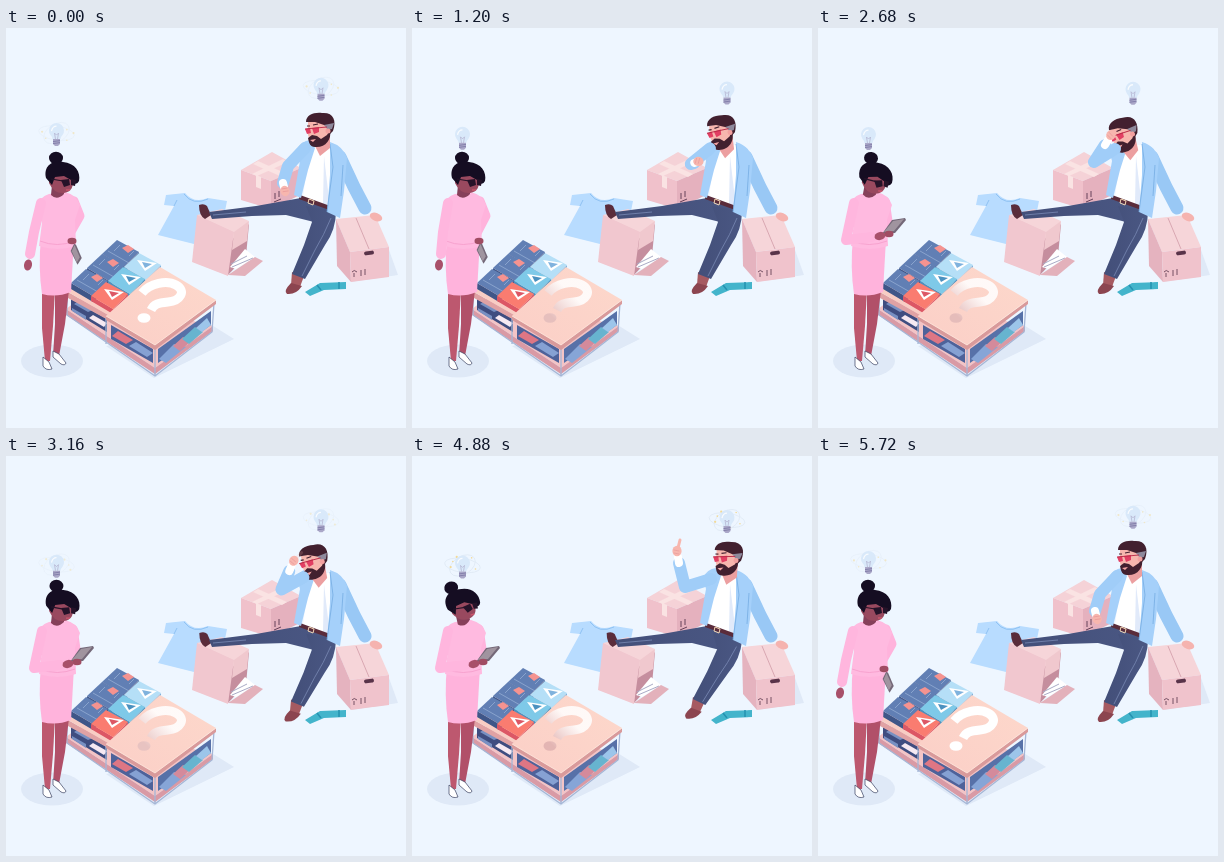
An HTML page that plays this animation: 400x400 px, repeating every 5760 ms.

```html
<!DOCTYPE html>
<html lang="en">
<head>
<meta charset="utf-8">
<style>
html, body { margin: 0; width: 100%; height: 100%; overflow: hidden; background: #eef6ff; }
svg { display: block; width: 100vw; height: 100vh; }
.limb { fill: none; stroke-linecap: round; stroke-linejoin: round; }
</style>
</head>
<body>
<svg viewBox="0 0 400 400">
  <defs>
    <linearGradient id="fade" gradientUnits="userSpaceOnUse" x1="136" y1="291" x2="166" y2="260">
      <stop id="fadeLow" offset=".1"/>
      <stop id="fadeHigh" offset=".8" stop-color="#fff"/>
    </linearGradient>
    <linearGradient id="board" x1="0" y1="1" x2="1" y2="0">
      <stop stop-color="#fbcfc7"/><stop offset="1" stop-color="#fdd8cb"/>
    </linearGradient>
    <linearGradient id="denim" x1="0" x2="1">
      <stop stop-color="#434f79"/><stop offset="1" stop-color="#4a5783"/>
    </linearGradient>
    <g id="jeans">
      <path fill="#3f5688" d="M-15 14L7 27 22 12V17L7 33-15 20Z"/>
      <path fill="#617fb4" d="M0 0L22 12 7 27-15 14Z"/>
      <path fill="none" stroke="#9bb3d8" stroke-width=".7" d="M-9 11L12 23M3 5L-3 11M17 11l-5 5"/>
      <path fill="#f59390" d="M5 8l6-3 6 4-6 4z"/>
    </g>
    <g id="shirt">
      <path fill="var(--d)" d="M-15 14L7 27 22 12V17L7 32-15 19Z"/>
      <path fill="var(--c)" d="M0 0L22 12 7 27-15 14Z"/>
      <path fill="#fff" d="M-2 7L18 10 6 18Z"/>
      <path fill="var(--d)" d="M3 9L13 11 6 15Z"/>
    </g>
    <g id="rings" fill="none" stroke-width=".8">
      <ellipse rx="18" ry="7" transform="rotate(8)"/>
      <ellipse rx="14" ry="9" transform="rotate(-32)"/>
    </g>
  </defs>

  <!-- ground shadows -->
  <g fill="#dfe9f7">
    <ellipse cx="46" cy="333" rx="31" ry="16.500"/>
    <path d="M100 318L148 350 228 311 204 296Z"/>
    <path d="M383 222L392 247 345 254Z"/>
  </g>

  <!-- shelf -->
  <g>
    <path fill="#f3c4c6" d="M60 281L80 266 207 298 149 340Z"/>
    <path fill="#d99aa5" d="M60 281L149 340 207 298V303L149 346 60 287Z"/>
    <path fill="#3f4d80" d="M65 271l36 20v13L65 282z"/>
    <path fill="#7890c2" d="M68 276l14 8 5-2-14-9zM66 280l14 8v4l-14-9z"/>
    <path fill="#f6e9f2" d="M83 290l15 9 3-4-14-8z"/>
    <path fill="#4e629a" d="M105 297l42 24v14l-42-24z"/>
    <path fill="#de7684" d="M106 308l14 8 7-4-15-9z"/>
    <path fill="#86a1d3" d="M123 318l18 11 6-4-17-11z"/>
    <path fill="#5771a8" d="M152 321L205 283v14l-53 38z"/>
    <path fill="#86a5d7" d="M153 331l15-15 12 3-20 16z"/>
    <path fill="#d48a9b" d="M167 318l10-9 8 4-11 10z"/>
    <path fill="#67b4cf" d="M176 311l13-12 8 5-14 12z"/>
    <path fill="#9cc5ea" d="M190 300l11-10 4 7-9 7z"/>
    <path fill="#e0a2a4" d="M62 264L104 288V293L62 270Z"/>
    <path fill="#f8cdc4" d="M62 264L111 214 155 239 104 288Z"/>
    <use href="#jeans" x="111" y="212"/>
    <use href="#jeans" x="96" y="226"/>
    <use href="#jeans" x="80" y="241"/>
    <g style="--c:#b5dff7;--d:#7fb2dd"><use href="#shirt" x="133" y="225"/></g>
    <g style="--c:#7ec9e8;--d:#4b91bf"><use href="#shirt" x="117" y="239"/></g>
    <g style="--c:#fa7c70;--d:#dc5765"><use href="#shirt" x="100" y="254"/></g>
    <path fill="none" stroke="#a5b6d6" stroke-width="1.300" d="M61 266v21L149 348 206 304 208 275M100 290v26M149 319v29"/>
    <path fill="#d99a9b" d="M100 288L149 317 210 272V276L149 322 100 292Z"/>
    <path fill="url(#board)" d="M100 288L154 239 210 272 149 317Z"/>
    <path fill="none" stroke="#fee8dc" stroke-width=".8" d="M100 288L149 317 210 272"/>
    <path fill="none" stroke="url(#fade)" stroke-width="9" d="M136 265C144 255 161 252 170 257C181 263 174 273 162 274C152 275 148 276 145 282"/>
    <ellipse cx="138" cy="290" rx="6.500" ry="4.800" fill="url(#fade)"/>
  </g>

  <!-- tee and boxes -->
  <path fill="#b8dcff" d="M160 167L179 165Q188 176 202 170L221 173 219 183 208 184 188 216 152 207 168 178 158 177Z"/>
  <path fill="none" stroke="#8fc2f3" d="M178 166Q187 178 202 171M168 178L171 172"/>
  <g>
    <path fill="#f5d2d7" d="M235 142L266 124 295 140 265 153Z"/>
    <path fill="#f0c1cb" d="M235 142L265 153V181L235 172Z"/>
    <path fill="#e5b1be" d="M265 153L295 140 292 168 265 181Z"/>
    <path fill="#fae3e3" d="M247 136l5-3 29 13-5 3zM250 147l5 2v12l-5-2zM277 131l5 3-31 14-5-2z"/>
    <path fill="none" stroke="#67425a" d="M269 171v-6M273 169v-6M268 174l7-3"/>
  </g>
  <g>
    <path fill="#c58e9e" d="M222 214L243 196 240 228 222 247Z"/>
    <path fill="#fff" d="M224 239L239 221 249 229 230 241Z"/>
    <path fill="none" stroke="#a9abc6" d="M226 239l21-9M225 236l16-8"/>
    <path fill="#e3b1bb" d="M222 247L249 229 257 233 239 248Z"/>
    <path fill="#f6d5d9" d="M191 187L216 181 243 193 226 212Z"/>
    <path fill="#f1c7cf" d="M191 187L228 204 222 248 186 234Z"/>
    <path fill="#f0c8ce" d="M228 204L243 193 241 213 226 222Z"/>
  </g>
  <g>
    <path fill="#f6d5d9" d="M330 191L369 187 383 219 344 224Z"/>
    <path fill="#e5b3bf" d="M330 191L344 224 345 254 331 238Z"/>
    <path fill="#f0c3cc" d="M344 224L383 219V249L345 254Z"/>
    <path fill="none" stroke="#d19ba8" stroke-width=".8" d="M350 190L363 221"/>
    <rect x="358" y="223" width="10" height="4" rx="2" fill="#593349" transform="rotate(-7 363 225)"/>
    <path fill="none" stroke="#684459" stroke-width=".9" d="M348 249v-4M346 244q2-3 5 0M355 248v-6M359 247v-6"/>
  </g>
  <path fill="#43b4cb" d="M299 264L314 255 340 254 340 261 318 262 304 268Z"/>
  <path fill="none" stroke="#2591b0" stroke-width="1.500" d="M333 254v7M311 257l4 5"/>

  <!-- man -->
  <g id="man">
    <path id="manFarShoe" fill="#5a2c3b" d="M193 177Q198 175 201 178L205 187 199 191Q193 188 193 177Z"/>
    <path fill="url(#denim)" d="M295 170L250 178 203 184 206 191 246 188 280 187 312 195 322 180Z"/>
    <g id="manLeg">
      <path fill="#a65a61" d="M286 244L298 248 294 259 285 257Z"/>
      <path fill="#8c4550" d="M285 255L296 258Q290 267 281 266Q277 263 285 255Z"/>
      <path fill="url(#denim)" d="M300 178L330 183Q330 202 319 217L299 251 286 246 298 217 306 194Z"/>
      <path fill="none" stroke="#7989b4" stroke-width=".8" d="M325 190Q318 207 309 222L296 248"/>
    </g>
    <path fill="none" stroke="#7989b4" stroke-width=".8" d="M240 184L207 187"/>
    <path fill="#fff" d="M307 117L325 117 326 181 297 169 301 139Z"/>
    <path fill="#e1eafa" d="M318 128l6 52-7-4z"/>
    <path fill="#5a2c3b" d="M294 167L327 179 326 183 293 171Z"/>
    <path fill="none" stroke="#f4d7b5" d="M303 171l5 2-1 4-5-2z"/>
    <path class="limb" stroke="#99c8f5" stroke-width="13" d="M334 129L348 159 359 180"/>
    <ellipse cx="370" cy="189" rx="6.500" ry="4" fill="#f5b3af" transform="rotate(20 370 189)"/>
    <path fill="#a5d0fa" d="M304 112L309 120 302 142 295 170 288 167 294 133 291 122Q295 113 304 112Z"/>
    <path fill="#a5d0fa" d="M324 114Q337 118 341 130L338 163 334 190 321 184 324 147Z"/>
    <path fill="none" stroke="#75ade3" stroke-width=".8" d="M324 116L327 139 321 184M337 137l-2 31"/>
  </g>
  <g id="manHead">
    <path fill="#ec9fa0" d="M311 106H324V120L314 128 309 118Z"/>
    <path fill="#f7b6ae" d="M302 94L322 92 324 106 318 114 305 115 302 107Z"/>
    <path fill="#42202f" d="M300 94C300 87 308 84 316 85C327 84 331 92 327 103L323 107 321 98 309 94Z"/>
    <path fill="#42202f" d="M302 110L306 107 311 108 315 111 321 107 324 102C326 112 319 120 309 119C304 119 303 115 302 110Z"/>
    <path fill="#8e899c" d="M318 97L328 95 326 101 322 102Z"/>
    <path fill="#f6a6a5" d="M304 112l6-1-3 3z"/>
    <circle cx="322" cy="103" r="2.500" fill="#f2a09f"/>
    <path fill="#e23f63" d="M299 101l5-1 1 5-4 1zM306 100l7-1v5l-5 2z"/>
    <path stroke="#b92846" stroke-width=".9" d="M299 101l22-2"/>
    <path stroke="#42202f" stroke-width="1.200" d="M301 98h3M307 97l5-1"/>
  </g>
  <path id="manArm" class="limb" stroke="#a0cdf8" stroke-width="12"/>
  <path id="manCuff" class="limb" stroke="#fff" stroke-width="8"/>
  <g id="manHand" fill="#f7b6ae">
    <ellipse rx="4.600" ry="5.200"/>
    <path id="finger" class="limb" stroke="#f7b6ae" stroke-width="3" d="M1-3L3-11"/>
    <path class="limb" stroke="#e99a9b" stroke-width=".7" d="M-3-1l5 1M-3 2l5 1"/>
  </g>

  <!-- woman -->
  <g id="woman">
    <path id="womanFarArm" class="limb" stroke="#ffb3dc" stroke-width="9"/>
    <path fill="#bd586f" d="M36 262H49L47 298 44 333H39L36 300Z"/>
    <path fill="#b15069" d="M49 262H63L59 296 53 328H47L49 296Z"/>
    <path fill="#fff" stroke="#39405f" stroke-width=".7" d="M37 329L43 334 46 341Q40 343 37 338ZM47 323L53 326 60 335Q59 338 55 336L47 329Z"/>
    <path fill="#ffb3dc" d="M35 209L68 211 65 264Q50 270 36 266Q32 240 35 209Z"/>
    <path fill="#ffbae0" d="M43 166L59 164Q71 167 74 177L69 192 70 218Q51 224 33 218L36 195 32 177Q34 169 43 166Z"/>
    <path fill="none" stroke="#f59ccb" stroke-width=".8" d="M34 213Q51 220 69 213"/>
    <g id="womanHead">
      <path fill="#86405a" d="M46 157H58V166Q51 173 45 167Z"/>
      <ellipse cx="50" cy="130" rx="7" ry="6.200" fill="#150d22"/>
      <path fill="#99495f" d="M43 146L66 147Q70 163 58 165Q48 166 43 155Z"/>
      <path fill="#150d22" d="M40 150C37 136 49 132 57 134C69 135 75 144 73 153Q70 159 65 152L58 148 49 149 46 157Z"/>
      <path fill="#251329" d="M55 152l8-1 1 6-6 2zM65 151l5 1-1 6-4-1z"/>
      <path stroke="#251329" stroke-width="1.200" d="M45 151l12 2"/>
      <path stroke="#cf576e" stroke-width="1.300" d="M60 162h4"/>
    </g>
    <g id="tablet">
      <path fill="#746878" d="M-12 8L-2-6 11-8 12-6 1 7Z"/>
      <path fill="#a0949f" d="M-10 6L-1-5 10-7 0 5Z"/>
    </g>
    <path id="womanArm" class="limb" stroke="#ffb6de" stroke-width="10"/>
    <ellipse id="womanFarHand" rx="4.500" ry="3.200" fill="#a04c63"/>
    <ellipse id="womanHand" rx="4" ry="5.500" fill="#a8506a"/>
  </g>

  <g id="bulbs"></g>
</svg>
<script>
const LOOP = 5760, BOB = 1920;
const $ = id => document.getElementById(id);
const set = (id, name, value) => $(id).setAttribute(name, value);
const mix = (a, b, k) => a + (b - a) * k;
const ease = k => k * k * (3 - 2 * k);

// keys: [time, ...values]; returns the eased values at time t
function track(t, keys) {
  let i = 0;
  while (i < keys.length - 2 && t >= keys[i + 1][0]) i++;
  const [t0, ...a] = keys[i], [t1, ...b] = keys[i + 1];
  const k = ease(Math.min(1, Math.max(0, (t - t0) / (t1 - t0))));
  return a.map((v, j) => mix(v, b[j], k));
}

// moves: [start, end, pose] one after another, beginning at the first pose
function pose(t, first, moves) {
  const keys = [[0, ...first]];
  let last = first;
  for (const [from, to, next] of moves) {
    keys.push([from, ...last], [to, ...next]);
    last = next;
  }
  return track(t, keys);
}

const limb = p => `M${p[0]} ${p[1]}L${p[2]} ${p[3]} ${p[4]} ${p[5]}`;
const place = (id, x, y, r = 0) => set(id, 'transform', `translate(${x} ${y}) rotate(${r})`);

function drawMan(t) {
  const schedule = (rest, think, point) =>
    pose(t, rest, [[900, 1480, think], [3040, 3480, point], [4920, 5440, rest]]);
  const arm = schedule(
    [299, 120, 282, 138, 277, 155],
    [297, 121, 276, 134, 287, 117],
    [299, 123, 273, 131, 267, 107]);
  const [hx, hy, hr, finger] = schedule([279, 163, 160, 0], [293, 107, 35, 0], [265, 95, 0, 1]);
  const [dx, dy, turn] = schedule([0, 0, 0], [-4, 4, -13], [1, 1, 4]);
  const [swing] = schedule([0], [0], [5]);
  set('manArm', 'd', limb(arm));
  set('manCuff', 'd', `M${arm[4]} ${arm[5]}L${mix(arm[4], hx, .5)} ${mix(arm[5], hy, .5)}`);
  place('manHand', hx, hy, hr);
  set('finger', 'opacity', finger);
  set('manHead', 'transform', `translate(${dx} ${dy}) rotate(${turn} 316 118)`);
  set('manLeg', 'transform', `rotate(${swing} 318 185)`);
  set('manFarShoe', 'transform', `translate(${swing / 3} 0)`);
}

function drawWoman(t) {
  const schedule = (rest, hang, low, hold) => pose(t, rest,
    [[0, 600, hang], [1240, 1760, low], [1900, 2440, hold], [4920, 5520, rest]]);
  const near = schedule(
    [35, 175, 28, 204, 24, 226], [36, 175, 31, 204, 29, 226],
    [37, 175, 32, 204, 32, 225], [36, 175, 28, 212, 54, 209]);
  const far = schedule(
    [68, 173, 74, 188, 62, 209], [68, 173, 74, 188, 63, 209],
    [68, 173, 73, 191, 66, 208], [67, 173, 70, 193, 67, 202]);
  const [nx, ny, nr] = schedule([22, 237, 12], [27, 237, 5], [32, 236, 0], [62, 208, 75]);
  const [fx, fy] = schedule([66, 213], [67, 213], [66, 212], [71, 206]);
  const [tx, ty, tr, tw] = schedule([70, 226, -50, .6], [70, 225, -50, .6], [68, 218, -50, .1], [76, 198, 0, 1]);
  const [turn] = pose(t, [0], [[1240, 1760, [-5]], [1900, 2440, [5]], [3040, 3480, [-18]], [4960, 5480, [0]]]);
  set('womanArm', 'd', limb(near));
  set('womanFarArm', 'd', limb(far));
  place('womanHand', nx, ny, nr);
  place('womanFarHand', fx, fy);
  set('tablet', 'transform', `translate(${tx} ${ty}) rotate(${tr}) scale(${tw} ${Math.min(1, tw * 1.7)})`);
  set('womanHead', 'transform', `rotate(${turn} 50 165)`);
}

function bulb(x, y, t, wave) {
  const [lit] = track(t, [[0, 0], [3160, 0], [3400, 1], [4400, 1], [4800, 0], [LOOP, 0]]);
  const [halo] = track(t, [[0, .35], [560, 0], [3040, 0], [3400, 1], [4500, 1], [4880, .7], [5600, .35], [LOOP, .35]]);
  const dots = [0, 1, 2, 3, 4, 5].map(i => {
    const a = i * 2.4 + t / LOOP * Math.PI * 4;
    const r = 1 - i % 3 * .14;
    return `<circle cx="${17 * r * Math.cos(a)}" cy="${9 * r * Math.sin(a)}" r="${i % 2 ? .8 : 1.1}"/>`;
  }).join('');
  const glass = 'M-4 6Q-4 4-6 2A7.500 7.500 0 1 1 6 2Q4 4 4 6Z';
  return `<g transform="translate(${x} ${y - 2.2 * wave})">
    <g opacity="${halo}">
      <g opacity=".6" stroke="${lit > .4 ? '#f3d77f' : '#cbd8e7'}"><use href="#rings"/></g>
      <g fill="#f5ce68">${dots}</g>
    </g>
    <path fill="#d9e9fa" d="${glass}"/>
    <path fill="#ffd34f" opacity="${lit}" d="${glass}"/>
    <path fill="none" stroke="#fff" stroke-width="1.300" opacity=".8" d="M-5-2Q-4-7 0-7"/>
    <path fill="none" stroke="#b5b5d2" stroke-width=".8" d="M-1 6L-2 0 0 2 2 0 1 6"/>
    <path fill="#aaa7c8" d="M-3.500 6H3.500V11L1.500 13H-1.500L-3.500 11Z"/>
    <path stroke="#7f7ba8" stroke-width=".9" d="M-3.500 8.500L3.500 7.500M-3.500 10.500L3.500 9.500"/>
  </g>`;
}

function draw(t) {
  const wave = Math.cos(t / BOB * Math.PI * 2);
  const full = (wave + 1) / 2;
  const [r, g, b] = [226, 180, 178].map(v => Math.round(mix(v, 255, full)));
  set('fadeLow', 'stop-color', `rgb(${r},${g},${b})`);
  set('fadeHigh', 'stop-opacity', mix(.85, 1, full));
  drawMan(t);
  drawWoman(t);
  $('bulbs').innerHTML = bulb(50.5, 107.3, t, wave) + bulb(315, 62, t, wave);
}

const start = performance.now();
function frame() {
  draw((performance.now() - start) % LOOP);
  requestAnimationFrame(frame);
}
frame();
</script>
</body>
</html>
```
